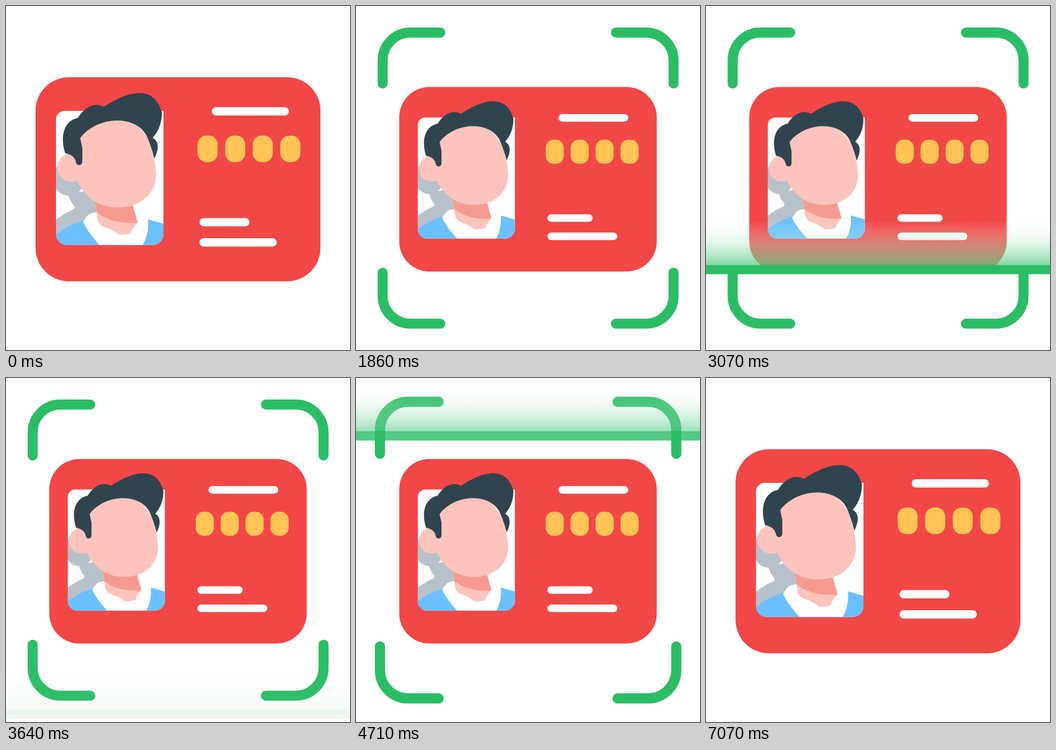
An HTML page that plays this animation: 640 by 640 pixels, repeating every 7280 ms.

```html
<!DOCTYPE html>
<html lang="en">
<head>
<meta charset="utf-8">
<title>ID card scan</title>
<style>
  html, body { margin: 0; width: 100%; height: 100%; overflow: hidden; background: #fff; }
  svg { display: block; width: 100%; height: 100%; }
</style>
</head>
<body>
<svg viewBox="0 0 640 640">
  <defs>
    <linearGradient id="glow" x2="0" y2="1">
      <stop offset="0" stop-color="#fff" stop-opacity="0"/>
      <stop offset="1" stop-color="#57cb85" stop-opacity=".73"/>
    </linearGradient>
    <clipPath id="photo"><path d="M93 211a16 16 0 0 1 16-16H293V424a20 20 0 0 1-20 20.500H113a20 20 0 0 1-20-20Z"/></clipPath>
  </defs>

  <g id="frame" fill="none" stroke="#2bbd66" stroke-width="18.600" stroke-linecap="round"></g>

  <g id="card">
    <rect x="55" y="132.600" width="530" height="379.600" rx="62" fill="#f24747"/>
    <g clip-path="url(#photo)">
      <path fill="#fff" d="M90 190H300V450H90Z"/>
      <g id="shadow" fill="#b7c1cc">
        <ellipse cx="117" cy="320" rx="30" ry="33"/>
        <path d="M116 350Q118 362 126 371 130 376 124 379 107 386 90 400V430H172V340Z"/>
      </g>
      <path id="shirt" fill="#6bc0ff" d="M90 428Q114 407 145 399L264 397 300 407V450H90Z"/>
      <path id="collar" fill="#fff" d="M169 384Q152 383 143.500 402 152 421 178 449H252Q267 425 264 397L235 385Z"/>
    </g>
    <g id="skin" fill="#fcc4bd">
      <path d="M165 360L170 397Q172 408 186 412 199 416 210 425.500 222 426 232 423 235 413 244.500 403L235 365Z"/>
      <path fill="#f69a90" d="M164 355L169 384Q198 407 245 403L234 365Z"/>
      <ellipse cx="121.500" cy="300.500" rx="26" ry="26.500"/>
      <path d="M138 246Q205 160 264 247 279 288 279 316C277 355 245 375 208 375S147 354 132 325V280Z"/>
    </g>
    <path id="hair" fill="#30444f" d="M111 276C101 250 104 214 134 208 146 188 165 178 182 187.500 240 149 279 155 290 198Q290 226 273 245 290 255 276 284 272 267 264 247C247 201 170 203 138 246L142 264V290a6 6 0 0 1-12 0Q127 277 111 274Z"/>
    <path id="lines" fill="none" stroke="#fff" stroke-width="15.600" stroke-linecap="round" d="M390.500 196h128M367.800 402.200h77.400M367.800 439.700h128.200"/>
    <g id="digits" fill="#ffc455"></g>
  </g>

  <g id="scan">
    <rect y="-83" width="640" height="83" fill="url(#glow)"/>
    <rect width="640" height="17.500" fill="#2bbd66"/>
  </g>

  <g fill="#ffc93c">
    <path id="starTop"/>
    <path id="starLow"/>
  </g>
</svg>
<script>
const LOOP = 7280;
const el = id => document.getElementById(id);

// Four equal digits, four mirrored corners, four quarter turns of a star.
for (let i = 0; i < 4; i++) {
  el('digits').innerHTML +=
    `<rect x="${356.5 + i * 51.3}" y="241" width="37.2" height="49.5" rx="16.5"/>`;
  const sx = i % 2 ? -1 : 1, sy = i < 2 ? 1 : -1;
  el('frame').innerHTML +=
    `<path d="M-163.4-270.8H-219a51.6 51.6 0 0 0-51.6 51.6V-176" transform="translate(320.2 320.2) scale(${sx} ${sy})"/>`;
}

function starPath(r) {
  let d = `M0 ${-r}`;
  for (let i = 0, x = 0, y = -1; i < 4; i++, [x, y] = [-y, x]) {
    const at = (a, b) => `${(a * x - b * y) * r} ${(a * y + b * x) * r} `;
    d += 'C' + at(.31, .13) + at(.13, .31) + at(0, 1);
  }
  return d + 'Z';
}
el('starTop').setAttribute('d', starPath(68));
el('starLow').setAttribute('d', starPath(54.7));

const place = (id, transform) => el(id).setAttribute('transform', transform);
const zoom = (s, y) => `translate(320 ${y}) scale(${s}) translate(-320 ${-y})`;

function draw(t) {
  // Sine ease from 0 to 1 between two times.
  const ease = (from, to) => {
    const p = Math.min(1, Math.max(0, (t - from) / (to - from)));
    return (1 - Math.cos(Math.PI * p)) / 2;
  };

  const card = 1 - .096 * ease(570, 1290) + .126 * ease(4720, 5050) - .03 * ease(5050, 6500);
  const frame = ease(570, 1174) + .021 * ease(4160, 4860) - 1.021 * ease(4860, 5140);
  place('card', zoom(card, 322.4));
  place('frame', zoom(frame, 320));

  const scanY = 92 + 525 * (ease(2146, 3546) - ease(3620, 4797));
  const alpha = ease(2330, 2600) - ease(3230, 3490) + ease(3590, 3850) - ease(4620, 4930);
  place('scan', `translate(0 ${scanY})`);
  el('scan').setAttribute('opacity', alpha);

  const pulse = .08 * (ease(5700, 6250) - ease(6250, 7000));
  const star = (ease(5150, 5700) + pulse) * (1 - ease(6720, 7075));
  place('starTop', `translate(492.5 113.5) rotate(-30.5) scale(${star})`);
  place('starLow', `translate(125 527.5) rotate(31) scale(${star})`);
}

const start = performance.now();
function tick() {
  draw((performance.now() - start) % LOOP);
  requestAnimationFrame(tick);
}
tick();
</script>
</body>
</html>
```
